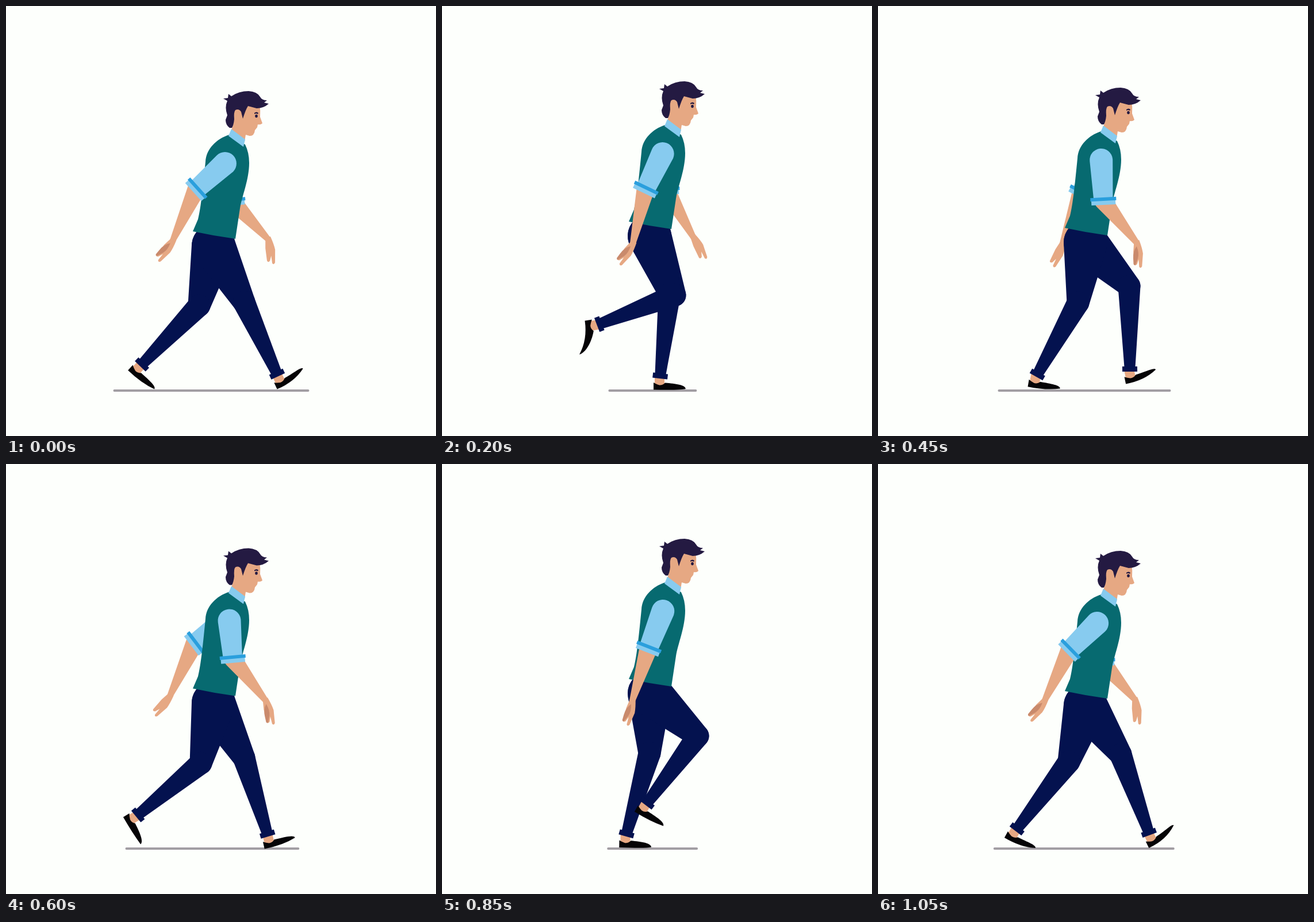
Write an HTML page with a canvas that moves like this. It is 748 px wide and 748 px high and loops after 1.1 s.

```html
<!DOCTYPE html>
<html lang="en">
<head>
<meta charset="utf-8">
<title>Walk cycle</title>
<style>
  html, body { margin: 0; width: 100%; height: 100%; overflow: hidden; background: #fdfffc; }
  canvas { display: block; width: 748px; height: 748px; }
</style>
</head>
<body>
<canvas id="stage" width="748" height="748"></canvas>
<script>
const ctx = document.getElementById('stage').getContext('2d');
const STEPS = 22, STEP_MS = 50;
const C = {
  bg: '#fdfffc', navy: '#04124f', vest: '#076a70', shirt: '#87cbef', stripe: '#2a9fdd',
  skin: '#e6a883', shade: '#c98a6c', hair: '#241a42', shoe: '#050406', ground: '#a29ea3'
};

// Smooth periodic curve through values vs at steps ts.
function curve(ts, vs) {
  const n = ts.length;
  const gap = i => (ts[(i + 1) % n] - ts[i] + STEPS) % STEPS;
  const rate = i => (vs[(i + 1) % n] - vs[i]) / gap(i);
  const slope = vs.map((_, i) => {
    const p = (i + n - 1) % n;
    return (rate(p) * gap(i) + rate(i) * gap(p)) / (gap(p) + gap(i));
  });
  return k => {
    let i = n - 1;
    while (ts[i] > k) i--;
    const j = (i + 1) % n, h = gap(i), u = (k - ts[i]) / h, w = 1 - u;
    return vs[i] * (1 + 2 * u) * w * w + slope[i] * h * u * w * w
         + vs[j] * u * u * (3 - 2 * u) - slope[j] * h * u * u * w;
  };
}
const track = keys => curve(keys.map(r => r[0]), keys.map(r => r[1]));

const bob = track([[0, 17], [4, 0], [7, 0], [9, 11], [11, 18], [14, 5], [17, -1], [21, 20]]);
const shadow = track([[0, 170], [4, 76.5], [7, 106.5], [9, 150], [11, 167], [14, 99], [17, 78.5], [21, 157]]);

// A chain of joints; keys are [step, x1, y1, x2, y2, ...extras].
function chain(rootX, rootY, joints, keys) {
  const ts = keys.map(r => r[0]);
  const at = (r, j) => j < 0 ? [rootX, rootY + bob(r[0])] : [r[1 + 2 * j], r[2 + 2 * j]];
  const bones = [];
  for (let j = 0; j < joints; j++) {
    const d = keys.map(r => {
      const [ax, ay] = at(r, j - 1), [bx, by] = at(r, j);
      return [Math.atan2(bx - ax, by - ay), Math.hypot(bx - ax, by - ay)];
    });
    bones.push([curve(ts, d.map(v => v[0])), curve(ts, d.map(v => v[1]))]);
  }
  const extras = [];
  for (let c = 1 + 2 * joints; c < keys[0].length; c++) extras.push(curve(ts, keys.map(r => r[c])));
  return k => {
    let x = rootX, y = rootY + bob(k);
    const pts = [{ x, y }];
    for (const [angle, len] of bones) {
      const a = angle(k), l = len(k);
      x += Math.sin(a) * l;
      y += Math.cos(a) * l;
      pts.push({ x, y, a });
    }
    return { pts, extra: extras.map(f => f(k)) };
  };
}

// Legs: knee, ankle, foot tilt in degrees, toe bend.
const leg = keys => chain(361, 400, 2, keys);
const nearLeg = leg([
  [0, 414, 515, 470, 637, -25, -12],
  [2, 415, 501, 426, 640, 0, 0],
  [4, 396, 500, 380, 640, 0, 0],
  [7, 361, 505, 322, 640, 1, 0],
  [9, 348, 516, 279, 638, 10, -5],
  [11, 336, 521, 239, 621, 42, -5],
  [14, 365, 515, 250, 589, 78, 13],
  [17, 445, 473, 359, 587, 30, -2],
  [21, 422, 505, 470, 638, -26, -15]
]);
const farLeg = leg([
  [0, 336, 521, 239, 621, 42, -5],
  [4, 405, 503, 277, 552, 80, 21],
  [7, 446, 472, 387, 600, 21, 3],
  [9, 437, 487, 438, 628, -12, -12],
  [11, 414, 515, 470, 637, -25, -12],
  [13, 415, 502, 427, 640, 0, 0],
  [14, 409, 497, 404, 640, 0, 0],
  [17, 361, 503, 322, 640, 1, 0],
  [21, 332, 518, 244, 632, 29, -9]
]);

// Arms: elbow, wrist, fingertip.
const arm = keys => chain(388, 257, 3, keys);
const nearArm = arm([
  [0, 331, 319, 290, 408, 267, 442],
  [4, 354, 319, 332, 413, 310, 450],
  [7, 390, 327, 428, 413, 428, 459],
  [9, 392, 339, 450, 412, 457, 458],
  [11, 395, 341, 457, 409, 465, 452],
  [14, 388, 332, 421, 420, 445, 458],
  [17, 359, 321, 331, 412, 323, 455],
  [21, 333, 324, 290, 411, 267, 446]
]);
const farArm = arm([
  [0, 394, 340, 456, 406, 466, 451],
  [4, 391, 321, 437, 402, 460, 440],
  [7, 372, 322, 352, 412, 342, 452],
  [9, 353, 326, 321, 413, 306, 453],
  [11, 331, 319, 290, 408, 267, 442],
  [14, 333, 305, 296, 400, 279, 430],
  [17, 372, 320, 372, 410, 375, 452],
  [21, 390, 344, 447, 410, 456, 458]
]);

function fill(path, color) {
  ctx.fillStyle = color;
  ctx.fill(new Path2D(path));
}
function box(x, y, w, h, color) {
  ctx.fillStyle = color;
  ctx.fillRect(x, y, w, h);
}
function local(p, angle, draw) {
  ctx.save();
  ctx.translate(p.x, p.y);
  ctx.rotate(angle);
  draw();
  ctx.restore();
}

// Tapered limb: round at p, flat at q.
function limb(p, rp, q, rq, color, round) {
  const a = Math.atan2(q.y - p.y, q.x - p.x);
  const b = Math.acos((rp - rq) / Math.hypot(q.x - p.x, q.y - p.y));
  ctx.beginPath();
  ctx.arc(p.x, p.y, rp, a + b, a - b + 2 * Math.PI);
  if (round) ctx.arc(q.x, q.y, rq, a - b, a + b);
  else for (const s of [a - b, a + b]) ctx.lineTo(q.x + rq * Math.cos(s), q.y + rq * Math.sin(s));
  ctx.fillStyle = color;
  ctx.fill();
}

function drawLeg(pose) {
  const [hip, knee, ankle] = pose.pts, [tilt, bend] = pose.extra;
  limb(hip, 38, knee, 19.5, C.navy, true);
  limb(knee, 19.5, ankle, 9.5, C.navy);
  const foot = { x: ankle.x + 9 * Math.sin(ankle.a), y: ankle.y + 9 * Math.cos(ankle.a) };
  local(foot, tilt * Math.PI / 180, () => {
    box(-9, -5, 17, 16, C.skin);
    const toe = 17 + bend;
    fill(`M-11 6 L-11 18.5 Q${bend ? 22 : 36} 19.5 45 ${toe}
      C44 ${10 + bend * .8} 28 ${8 + bend * .25} 9 6.5 Q5 11 -1 10.5 Q-6 9 -11 6Z`, C.shoe);
  });
  local(ankle, -ankle.a, () => box(-13, -1, 26, 9, C.navy));
}

function drawArm(pose, shaded) {
  const [root, elbow, wrist, tip] = pose.pts;
  const cap = { x: root.x - .12 * (390 - elbow.x), y: root.y };
  limb(elbow, 15.5, wrist, 5, C.skin, true);
  local(wrist, -tip.a, () => {
    fill('M-4 -4 L5 -4 Q8 10 8 20 L3 42 Q0 46 -2 42 L-1 29 L-5 37 Q-9 40 -10 36 L-8 14Z', C.skin);
    if (shaded) fill('M-1 6 Q-9 14 -10 26 L-11 36 Q-9 40 -7 36 L-2 27 Q2 18 -1 6Z', C.shade);
  });
  limb(cap, 20, elbow, 16.5, C.shirt);
  local(elbow, -Math.atan2(elbow.x - cap.x, elbow.y - cap.y), () => {
    box(-21, -1, 42, 8, C.shirt);
    box(-22.5, -6, 45, 6, C.stripe);
  });
}

function drawTorso() {
  fill(`M388 207 C366 214 348 232 347 254 C343 295 339 335 334 354 L325 375
    Q362 383 399 388 L407 335 C410 315 423 285 423 256 Q423 238 416 224Z`, C.vest);
}

function drawHead() {
  fill(`M396 163 L415 150 L441 155 Q443 165 442 176 L446 187 Q443 190 438 189 L437 194
    L433 199 Q432 209 424 209 L417 207 L415 219 L391 201 Q396 190 396 180Z`, C.skin);
  fill('M392 197 L416 215 L413 228 L387 209Z', C.shirt);
  fill(`M389 195 Q382 190 382 181 L385 173 Q380 159 385 148 L378 144 L386 143 L387 136
    L392 140 Q405 131 422 131 Q437 132 442 141 Q445 147 454 147 L449 151 L457 153
    Q448 161 436 161 L421 157 Q417 163 412 179 L409 167 Q405 161 399 164
    Q396 167 397 180 Q396 190 393 195Z`, C.hair);
  ctx.fillStyle = C.hair;
  ctx.beginPath();
  ctx.ellipse(435.5, 174.5, 2.3, 2.8, 0, 0, 7);
  ctx.fill();
  fill('M432 169 Q436 166 439 169 L438 171 Q435 169 432 171Z', C.hair);
}

function drawGround(k) {
  const half = shadow(k), mid = 357 + (170 - half) * .1;
  ctx.strokeStyle = C.ground;
  ctx.lineWidth = 4;
  ctx.lineCap = 'round';
  ctx.beginPath();
  ctx.moveTo(mid - half + 1.5, 669);
  ctx.lineTo(mid + half - 1.5, 669);
  ctx.stroke();
}

function frame(now) {
  const k = Math.floor(now / STEP_MS) % STEPS;
  box(0, 0, 748, 748, C.bg);
  drawGround(k);
  drawArm(farArm(k), false);
  drawLeg(farLeg(k));
  drawLeg(nearLeg(k));
  local({ x: 0, y: bob(k) }, 0, () => { drawTorso(); drawHead(); });
  drawArm(nearArm(k), true);
  requestAnimationFrame(frame);
}
frame(performance.now());
</script>
</body>
</html>
```
